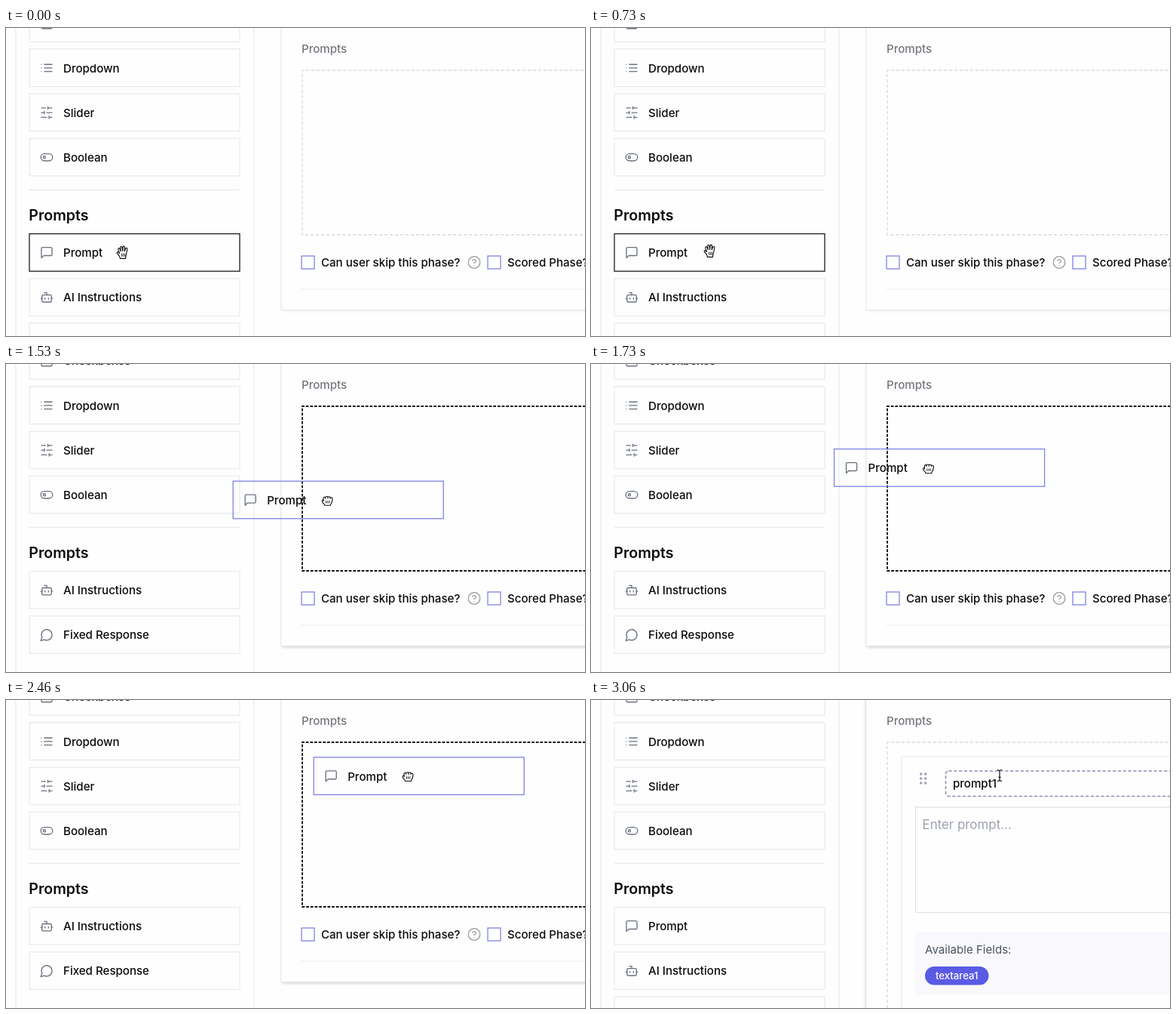
An HTML page for the animation above (3.66 s loop, 768 by 408 pixels).

```html
<!DOCTYPE html>
<html lang="en">
<head>
<meta charset="utf-8">
<title>Drag a prompt block</title>
<style>
  html, body { margin: 0; width: 100%; height: 100%; overflow: hidden; background: #fefefe; }
  svg { display: block; width: 100%; height: 100%; }
  text { font: 550 15.08px Inter, sans-serif; fill: #0c0c0e; white-space: pre; }
  .icon { fill: none; stroke: #6b7280; stroke-width: 1.75; stroke-linecap: round; stroke-linejoin: round; }
  .line { fill: none; stroke: #e8e9ec; stroke-width: 1.2; }
  .drag { fill: none; stroke: #7f83e2; stroke-width: 1.3; }
  .picked { fill: none; stroke: #1c1c1f; stroke-width: 1.3; }
  .hand { fill: #fff; stroke: #111; stroke-width: 1.15; stroke-linejoin: round; stroke-linecap: round; }
</style>
</head>
<body>
<svg id="stage" viewBox="0 0 768 408" preserveAspectRatio="none">
  <defs>
    <filter id="blur" x="-10%" y="-10%" width="120%" height="120%"><feGaussianBlur stdDeviation="2.2"/></filter>
  </defs>
</svg>
<script>
const NS = 'http://www.w3.org/2000/svg';
const stage = document.getElementById('stage');
const LOOP = 3660, PITCH = 59.2;

// Moments at which the picture is refreshed.
const TICKS = [0, 60, 130, 260, 330, 730];
for (let t = 1330; t <= 2930; t += 200) TICKS.push(t, t + 130);

const ICONS = {
  box: '<rect x="3" y="3" width="18" height="18" rx="2"/><path d="m9 12 2 2 4-4"/>',
  list: '<path d="M8 6h13M8 12h13M8 18h13M3 6h.01M3 12h.01M3 18h.01"/>',
  slider: '<path d="M21 4h-7M10 4H3M21 12h-9M8 12H3M21 20h-5M12 20H3M14 2v4M8 10v4M16 18v4"/>',
  toggle: '<rect x="2" y="6" width="20" height="12" rx="6"/><circle cx="8" cy="12" r="2"/>',
  chat: '<path d="M21 15a2 2 0 0 1-2 2H7l-4 4V5a2 2 0 0 1 2-2h14a2 2 0 0 1 2 2z"/>',
  bot: '<path d="M12 8V4H8M2 14h2M20 14h2M15 13v2M9 13v2"/><rect x="4" y="8" width="16" height="12" rx="2"/>',
  bubble: '<path d="M7.9 20A9 9 0 1 0 4 16.1L2 22Z"/>',
  help: '<g stroke="#96979d" stroke-width="1.6"><circle cx="12" cy="12" r="10"/><path d="M9.1 9a3 3 0 0 1 5.8 1c0 2-3 3-3 3M12 17h.01"/></g>'
};

function group(markup, parent = stage) {
  const g = document.createElementNS(NS, 'g');
  g.innerHTML = markup;
  parent.appendChild(g);
  return g;
}
const move = (g, x, y) => g.setAttribute('transform', `translate(${x.toFixed(2)} ${y.toFixed(2)})`);
const show = (g, on) => g.setAttribute('display', on ? 'inline' : 'none');
const icon = (name, cx, cy) =>
  `<g class="icon" transform="translate(${cx} ${cy}) scale(.78) translate(-12 -12)">${ICONS[name]}</g>`;
const label = (s, x, y, style = '') => `<text x="${x}" y="${y}" style="${style}">${s}</text>`;
const card = (name, s, cls = 'line') =>
  `<rect class="${cls}" width="279" height="49.6"/>${icon(name, 23, 25)}${label(s, 45, 30.7)}`;
const check = x =>
  `<rect x="${x}" y="302" width="17" height="17" fill="#fff" stroke="#7b7fe2" stroke-width="1.25"/>`;
const dashes = (color, width, dash, bottom) =>
  `<path d="M780 56H393V${bottom}H780" fill="none" stroke="${color}" stroke-width="${width}" stroke-dasharray="${dash}"/>`;

// Right panel
const shadow = group('<rect x="366" y="-20" width="440" height="395" fill="#000" filter="url(#blur)"/>');
const shortPanel = group('<rect class="line" x="365" y="-20" width="440" height="393.5" style="fill:#fefefe"/>');
const tallPanel = group(
  '<rect x="364" y="-20" width="440" height="460" fill="#000" opacity=".14" filter="url(#blur)"/>' +
  '<rect class="line" x="365" y="-20" width="440" height="460" style="fill:#fefefe"/>');
group(label('Prompts', 392, 32.5, 'fill:#74777f'));
const idleZone = group(dashes('#d8d9de', 1.3, '4.2 2.8', 274));
const hotZone = group(dashes('#111', 1.9, '3.75 1.9', 274));
const options = group(
  check(392) + label('Can user skip this phase?', 418, 316) + icon('help', 621, 310.5) +
  check(639) + label('Scored Phase?', 665, 316) + '<path class="line" d="M392 346H768"/>');

// Editor that replaces the dropped card
let dots = '';
for (let i = 0; i < 6; i++) dots += `<circle cx="${437.7 + i % 2 * 6}" cy="${98 + (i >> 1) * 6}" r="1.7"/>`;
const editor = group(
  dashes('#d8d9de', 1.3, '4.2 2.8', 420) +
  '<path class="line" d="M780 75H412V420"/>' +
  `<g fill="#9a9fb4">${dots}</g>` +
  '<rect x="470.5" y="94" width="320" height="33.5" rx="4" fill="none" stroke="#8b8fae" stroke-width="1.6" stroke-dasharray="4.2 2.6"/>' +
  label('prompt1', 480, 116.4) +
  '<rect class="line" x="430.5" y="142" width="360" height="139.5" style="stroke:#e0e2ea"/>' +
  label('Enter prompt...', 439.5, 170.6, 'font-size:16.9px;font-weight:400;fill:#9ca3af') +
  '<rect x="430" y="307" width="360" height="83" fill="#f9f9fd"/>' +
  label('Available Fields:', 443, 336.4, 'font-weight:400;fill:#4b5563') +
  '<rect x="443" y="353" width="84.5" height="24.5" rx="12.25" fill="#5a5be4"/>' +
  label('textarea1', 485.2, 370, 'font-size:13.2px;fill:#fff;text-anchor:middle'));

// Sidebar
group('<path class="line" d="M13 0V408M329 0V408"/>');
const side = group('');
[['box', 'Checkboxes'], ['list', 'Dropdown'], ['slider', 'Slider'], ['toggle', 'Boolean']].forEach(
  ([name, s], i) => move(group(card(name, s), side), 31, 27.9 + (i - 1) * PITCH));
group('<path class="line" d="M31 214.3H310"/>' +
  label('Prompts', 30.3, 255, 'font-size:19.6px;font-weight:620'), side);
const pickedCard = group(card('chat', 'Prompt', 'picked'), side);
const plainCard = group(card('chat', 'Prompt'), side);
const botCard = group(card('bot', 'AI Instructions'), side);
const replyCard = group(card('bubble', 'Fixed Response'), side);
move(pickedCard, 31, 272.6);
move(plainCard, 31, 272.6);

const dragged = group(card('chat', 'Prompt', 'drag'));

// Pointers, each drawn around its hot spot
const openHand = group('<g class="hand"><path d="M-3.6 8.4L-4.4 5.6C-5.4 4-7.4 2.2-7.8 1C-8-.2-6.8-.8-5.8 .2L-4.4 1.6L-6.2-3.6C-6.6-5.2-4.6-5.9-4-4.4L-2.8-1.2L-3.3-6.4C-3.3-8.1-1.3-8.2-1-6.6L-.4-1.6L.2-6.9C.4-8.4 2.4-8.2 2.4-6.6L2.2-1.3L3.8-4.9C4.4-6.2 6.2-5.6 5.9-4.2L4.8 1.4C4.5 4 3.7 5.5 3.4 8.4Z"/>' +
  '<path d="M-1.4 2V5.4M.6 2V5.4M2.5 2V5.4" stroke-width=".9"/></g>');
const fist = group('<g class="hand"><path d="M-3.6 6.2L-4 4.6C-5.6 3.4-7 2-7 .4C-7-.8-6-1.2-5-.8L-5.2-3C-5.2-5-3.2-5.2-2.5-4.2C-2-5.9 .3-5.9 .8-4.6C1.5-5.7 3.6-5.4 3.9-4C5.3-4.6 7.1-3.8 6.9-2L6.4 .8C6 3.2 4.6 4.2 4.2 6.2Z"/>' +
  '<path d="M-5-.8V.8M-2.5-4.2V-2.6M.8-4.6V-2.6M3.9-4V-2.4M-1.6 .4V3M.6 .4V3M2.7 .4V3" stroke-width=".9"/></g>');
const arrowPath = 'M0 0V13.2L3.1 10.4L5.2 15.2L7.5 14.2L5.4 9.5H9.6Z';
const arrow = group(
  `<path d="${arrowPath}" transform="translate(.6 1.6)" opacity=".3" filter="url(#blur)"/>` +
  `<path d="${arrowPath}" fill="#050505" stroke="#fff" stroke-width="1.1" stroke-linejoin="round"/>`);
const beamPath = 'M-3.2-7.3Q0-7.3 0-5.4Q0-7.3 3.2-7.3M0-5.4V5.6M-3.2 7.5Q0 7.5 0 5.6Q0 7.5 3.2 7.5M-1.6 2.4H1.6';
const beam = group(
  `<path d="${beamPath}" fill="none" stroke="#fff" stroke-width="2.6"/>` +
  `<path d="${beamPath}" fill="none" stroke="#111" stroke-width="1.2"/>`);

// Keys: time, x, y, and whether the stretch before it slows down
const POINTER = [
  [0, 155, 297], [330, 157, 296], [730, 158, 295], [1330, 199, 272], [1460, 408.6, 216],
  [1730, 447.5, 138.5, 1], [2130, 498, 106.3, 1], [2730, 542, 100, 1]
];
const CARD = [
  [1330, 237, 283], [1730, 322.6, 112.6, 1], [2130, 373.5, 80.8, 1],
  [2730, 417, 74.6, 1], [2860, 411.8, 75.1, 1]
];
function at(keys, t) {
  const i = keys.findIndex(k => k[0] > t);
  if (i < 0) return keys[keys.length - 1].slice(1, 3);
  if (i === 0) return keys[0].slice(1, 3);
  const [t0, x0, y0] = keys[i - 1], [t1, x1, y1, slow] = keys[i];
  let p = (t - t0) / (t1 - t0);
  if (slow) p = 1 - (1 - p) ** 2;
  return [x0 + (x1 - x0) * p, y0 + (y1 - y0) * p];
}

function draw(time) {
  let t = 0;
  for (const tick of TICKS) if (tick <= time) t = tick;
  const dragging = t >= 1330 && t < 3060;
  const done = t >= 3060;
  const over = t >= 1530 && !done;
  const lift = !dragging ? 0 : t < 1460 ? PITCH - 13.2 : PITCH;

  move(side, 0, t >= 1460 ? 2 : 0);
  show(pickedCard, t < 1330);
  show(plainCard, done);
  move(botCard, 31, 331.8 - lift);
  move(replyCard, 31, 331.8 + PITCH - lift);

  shadow.setAttribute('opacity', over ? .2 : .07);
  show(shadow, !done);
  show(shortPanel, !done);
  show(options, !done);
  show(tallPanel, done);
  show(editor, done);
  show(idleZone, !done && !over);
  show(hotZone, over);

  show(dragged, dragging);
  move(dragged, ...at(CARD, t));

  const shape = t < 1330 ? openHand : t < 2860 ? fist : done ? beam : arrow;
  for (const g of [openHand, fist, arrow, beam]) show(g, g === shape);
  move(shape, ...at(POINTER, t));
}

const start = performance.now();
function loop() {
  draw((performance.now() - start) % LOOP);
  requestAnimationFrame(loop);
}
loop();
</script>
</body>
</html>
```
